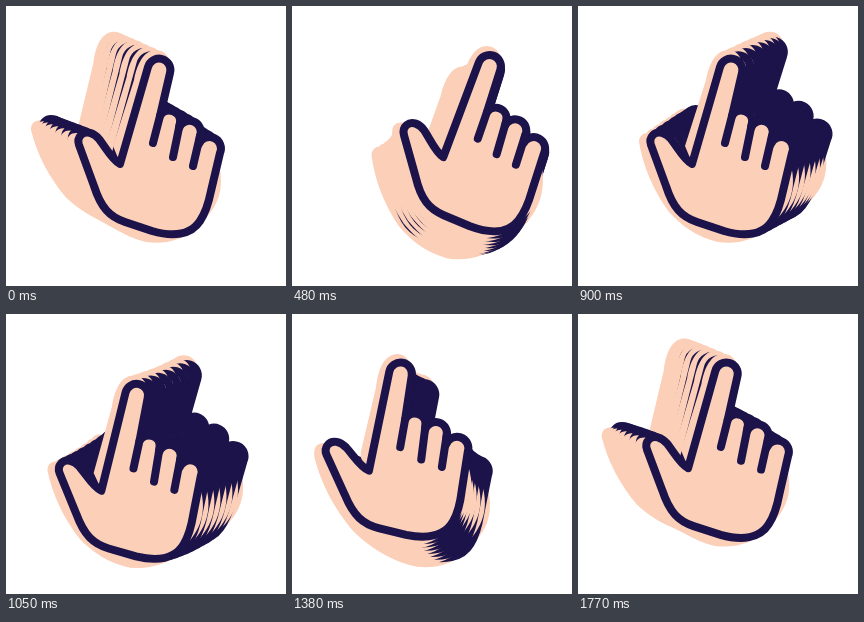
Animation, 280 px wide and 280 px high, one loop 1800 ms. Source, as an HTML page with a canvas:

```html
<!DOCTYPE html>
<html lang="en">
<head>
<meta charset="utf-8">
<title>Waving hand</title>
<style>
  html, body { margin: 0; width: 100%; height: 100%; overflow: hidden; background: #fff; }
  canvas { display: block; }
</style>
</head>
<body>
<canvas id="stage" width="280" height="280"></canvas>
<script>
const ctx = document.getElementById('stage').getContext('2d');
const SKIN = '#fbcfb8', INK = '#1b1349';
const LOOP = 1800, STEP = 30;
const COPIES = 7, LAG = 9.7 * Math.PI / 180;
const CENTER = [150, 150];

const hand = new Path2D(`M154 110 L164 67 A11.4 11.4 0 0 0 142 61 L114 158
  C106 154 100 142 93 133 C88 127 80 124 75 129 C72 132 72 136 73 139
  L88 180 C95 202 104 211 119 216 L146 225 C167 231 185 229 194 215
  C200 206 203 195 205 185 L214 147 A11.4 11.4 0 0 0 193 138
  L194 130 A11.2 11.2 0 0 0 173 122 L174 117 A10.8 10.8 0 0 0 154 110 Z`);
const slots = new Path2D('M154 110 L147 137 M174 117 L167 151 M194 130 L187 160');
// Loose colour patch that spills past the outline
const patch = new Path2D(`M128 74 C131 58 138 44 150 44 C158 44 163 50 164 58
  L160 76 L152 112 L210 150 C216 165 217 182 211 195
  C206 206 200 212 192 220 C180 233 160 239 140 236
  C118 231 103 219 91 206 C75 184 65 160 61 136
  C61 127 70 124 80 130 L112 152 L107 140 Z`);

function drawHand(angle, phase) {
  const swing = Math.sin(angle - phase);
  const bob = Math.sin(2 * angle - phase);
  ctx.save();
  ctx.translate(CENTER[0] + 38 * swing, CENTER[1] + 20 * bob);
  ctx.rotate(0.0785 * swing);
  ctx.translate(-CENTER[0], -CENTER[1]);
  ctx.fill(patch);
  ctx.fill(hand);
  ctx.stroke(hand);
  ctx.stroke(slots);
  ctx.restore();
}

function draw() {
  const time = Math.floor(performance.now() % LOOP / STEP) * STEP;
  const angle = time / LOOP * 2 * Math.PI;
  ctx.fillStyle = '#fff';
  ctx.fillRect(0, 0, 280, 280);
  ctx.fillStyle = SKIN;
  ctx.strokeStyle = INK;
  ctx.lineWidth = 8;
  ctx.lineCap = ctx.lineJoin = 'round';
  for (let i = COPIES; i >= 0; i--) drawHand(angle, i * LAG);
  requestAnimationFrame(draw);
}
draw();
</script>
</body>
</html>
```
